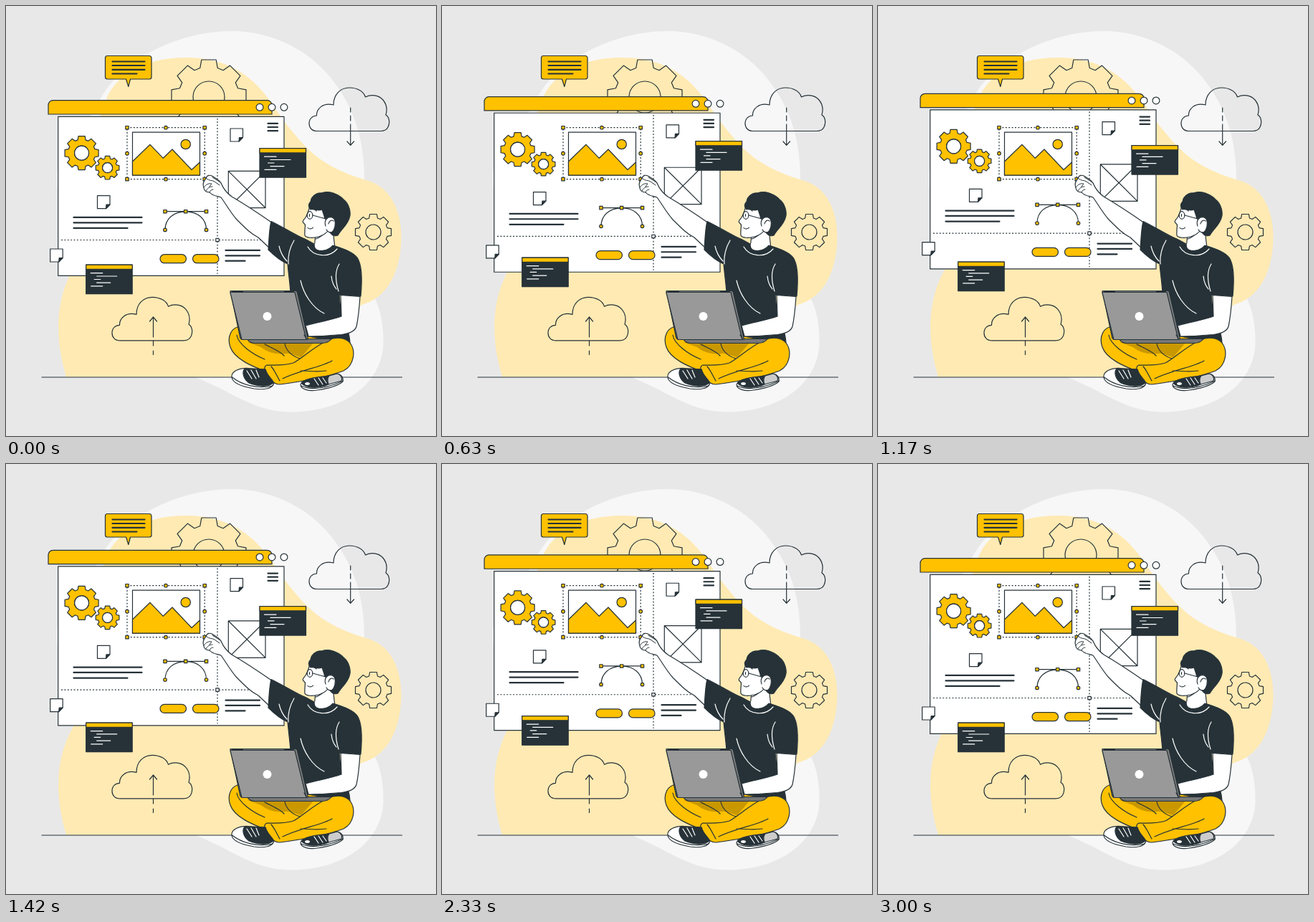
These frames come from a looping animation (600 px wide and 600 px high, 3.04 s). An HTML page:

```html
<!DOCTYPE html>
<html lang="en">
<head>
<meta charset="utf-8">
<title>Design at work</title>
<style>
html, body { margin: 0; width: 100%; height: 100%; overflow: hidden; background: #e8e8e8; }
svg { display: block; width: 600px; height: 600px; }
svg { fill: none; stroke: #263238; stroke-width: 1.2; stroke-linejoin: round; stroke-linecap: round; }
.y { fill: #ffc100; }
.w { fill: #fff; }
.d { fill: #263238; }
.flat { stroke: none; }
.bold { stroke-width: 2.2; }
.thin { stroke-width: 1; }
.light { stroke: #fff; }
.dots { stroke-dasharray: 2 2.4; stroke-linecap: butt; }
</style>
</head>
<body>
<svg viewBox="0 0 600 600">
  <defs>
    <g id="cloud">
      <path d="M434 174.5C427 174.5 423 170 423 164C423 157 428 153 433.500 153C433 144 442 134 457 138C457 123 467 114 479 114C490 114 499 119 501.500 127C509 123 520 124 526 131C532 138 532 145 530 152C535 155 536 163 533 169C531 173 528 174.500 523 174.500Z"/>
    </g>
    <g id="note">
      <path class="w" d="M0 0H17.500V12L12 18H0Z"/>
      <path class="d" d="M17.500 12.500H12.500L12 18Z"/>
    </g>
    <g id="console">
      <path class="d" d="M0 0H64.500V40.500H0Z"/>
      <path class="y" d="M0 0H64.500V6.200H0Z"/>
      <path class="light" d="M6.500 11.500H23M15 15.800H43M11.500 20.300H20M15 25H34M7 29.700H23"/>
    </g>
    <path id="knob" class="y" d="M-2.200-2.200H2.200V2.200H-2.200Z"/>
    <circle id="dot" class="y" r="2.300"/>
  </defs>

  <!-- backdrop -->
  <path class="flat" fill="#f7f7f7" d="M315 35C375 35 430 65 462 112C490 152 501 195 500 250L505 395C520 410 527 438 526.500 470C526 520 480 566 398 566.500C345 566 320 540 262 517L120 400C95 350 70 290 71 235C72 200 110 175 131 131C160 75 240 35 315 35Z"/>
  <path class="flat" fill="#ffeab3" d="M84 517.500C69 467 69 420 87 380C97 360 120 330 122 250C123 200 125 165 140 130C155 92 200 72 250 72C315 72 346 102 369 133C384 156 399 176 416 194C442 222 475 235 509 245C540 257 552 290 551.500 325C550 375 530 408 496 417L400 517.500Z"/>
  <path d="M50 518H552.500"/>
  <use href="#cloud"/>
  <use href="#cloud" x="-275" y="292.300"/>
  <path d="M480.700 142V148M480.700 153V160M480.700 165V194M476 189L480.700 194.300L485.500 189M205.500 486.500V481M205.500 474V467M205.500 462V434M200.500 440L205.500 434L210.500 440"/>
  <path class="gear" data-gear="283 127 52 22"/>
  <path class="gear" data-gear="512.500 315.500 25 10.500"/>
  <path class="y" d="M141.500 69.500H200A3 3 0 0 1 203 72.500V99A3 3 0 0 1 200 102H173.500L170.800 112.500L167.500 102H141.500A3 3 0 0 1 138.500 99V72.500A3 3 0 0 1 141.500 69.500Z"/>
  <path class="bold" d="M148.500 77.500H193.500M148.500 83H193.500M148.500 88.800H193.500M148.500 94.500H182.500"/>

  <!-- browser window -->
  <g id="win">
    <path class="y" d="M59 151.300V138.500A6.500 6.500 0 0 1 65.500 132H364.500A6.500 6.500 0 0 1 371 138.500V151.300Z"/>
    <g class="w"><circle cx="354" cy="141.600" r="4.900"/><circle cx="371" cy="141.600" r="4.900"/><circle cx="388" cy="141.600" r="4.900"/></g>
    <path class="w" d="M72.700 154.600H388V376.600H72.700Z"/>
    <path class="dots" d="M77 326.800H386M295 157V374"/>
    <path class="w" d="M292.800 324.600H297.200V329H292.800Z"/>
    <path class="bold" d="M365.500 164.200H379M365.500 169.300H379M365.500 174.500H379M94.500 295.200H189.500M94.500 302.600H189.500M94.500 310.200H169.500M306.500 341.200H354M306.500 348.600H354M306.500 356H333.500"/>
    <rect class="y" x="215" y="347" width="36.500" height="12" rx="6"/>
    <rect class="y" x="260.500" y="347" width="36.500" height="12" rx="6"/>
    <path class="gear y" data-gear="105.600 205.500 23.500 10"/>
    <path class="gear y" data-gear="141.600 226 16.300 7"/>
    <circle class="w" cx="105.600" cy="205.500" r="10"/>
    <circle class="w" cx="141.600" cy="226" r="7"/>
    <use href="#note" x="313" y="171.300"/>
    <use href="#note" x="127.500" y="265"/>
    <use href="#note" x="61.700" y="339.300"/>
    <path class="w" d="M310.300 230.600H362V282H310.300ZL362 282M362 230.600L310.300 282"/>
    <path d="M222 287H279.500M222 312.700C222 297 234 287.200 250.700 287.200S279.500 297 279.500 312.700"/>
    <use href="#knob" x="222" y="287"/><use href="#knob" x="250.700" y="287"/><use href="#knob" x="279.500" y="287"/>
    <use href="#dot" x="222" y="312.700"/><use href="#dot" x="279.500" y="312.700"/>
  </g>

  <!-- picture being dragged -->
  <path class="dots" d="M169 169.700H277.200V241.700H169Z"/>
  <path class="w" d="M176.500 176.200H270.500V236.200H176.500Z"/>
  <path class="y" d="M176.500 217L201 193.300L219.300 212.300L232 200L259 228.500L270.500 218V236.200H176.500Z"/>
  <circle class="y" cx="250.700" cy="193" r="6.700"/>
  <use href="#knob" x="169" y="169.700"/><use href="#knob" x="277.200" y="169.700"/>
  <use href="#knob" x="169" y="241.700"/><use href="#knob" x="277.200" y="241.700"/>
  <use href="#dot" x="223" y="169.700"/><use href="#dot" x="223" y="241.700"/>
  <use href="#dot" x="169" y="205.700"/><use href="#dot" x="277.200" y="205.700"/>

  <g class="float"><use href="#console" x="354" y="199.300"/></g>
  <g class="float"><use href="#console" x="111.700" y="361.800"/></g>

  <!-- raised arm -->
  <path class="w" d="M372 303C352 289 332 276 315 266C308 261 304 256 301 249C299 243 293 241 289 238C285 235 280 236 279.500 240C276 244 274 249 276 253C276 257 279 260 284 260C288 265 294 265 300 267C306 275 313 288 322 298C335 311 342 318 352 323L368 338Z"/>
  <path class="thin" d="M280 241C283 244 288 243 291 245L298 250M276 253C279 249 283 247 287 248L284 252M279 258C281 254 284 252 288 252M284 260C285 257 287 256 289 256M288 239L299 246"/>

  <!-- head -->
  <path class="w" d="M432 317L430 340C440 350 453 347 459 338L456 312Z"/>
  <path class="w" d="M424 279C422 287 420 292 418 295C416 298 413 300 414.500 302C416 303.500 418 304 417.500 307C417 312 416.500 316 417 320C419 324 428 324 436 322C444 320 450 314 454 308L455 280Z"/>
  <path class="d" d="M425 284C421 280 422 276 425 273C426 265 434 260 440 261C450 257 464 262 471 270C479 276 482 289 479 296C476 306 468 311 463 320C458 322 454 319 452 316L448 296C446 298 444 297 444 293C443 290 442 287 441 284C434 287 429 282 425 284Z"/>
  <path class="w" d="M446 307C443 299 449 293 455 295C461 297 460 308 457 313C454 318 449 316 447 312"/>
  <path d="M450 304C451 299 455 298 457 300M421 309.500C423 312 427 311 428.500 309M426 282C429 282 431 284 433 286M428 292L446 297"/>
  <ellipse cx="424" cy="292" rx="3.800" ry="5.300"/>
  <path d="M423.500 290.500V293.500M441 320C437 323 434 325 432 325"/>

  <!-- far arm and shirt -->
  <path class="d" d="M370 300.500C386 308 406 321 419 326L430 332C429 342 441 346 456 334C470 338 484 343 490 351C497 361 497 384 495 405L465 403L468 434C473 445 481 455 480 478H400L397 400C396 385 394 372 393 360C384 356 374 348 366 340C367 327 367 313 370 300.500Z"/>
  <path class="w" d="M467 403.500L494 405.500C493 420 492 434 489 447C487 454 480 457 468 458.500C450 460 434 461 422 461L418 446C434 441 452 439 468 433Z"/>
  <path class="w" d="M431 331C428 342 447 345 456 333L456 329Z" stroke="none"/>
  <path class="light" d="M421 336C429 350 451 352 462 339M402 327C396 337 393 346 394 360M381 335C383 344 388 352 392 356M465 360C458 371 460 385 464 398M454 377C455 387 458 391 461 395M411 383C415 401 427 421 444 429"/>

  <!-- crossed legs -->
  <path class="y" d="M329 447C314 447 308 462 313 476C319 493 344 503 365 511L416 508L449 466L410 459Z"/>
  <path class="flat" fill="#c99800" d="M337 469L430 469L412 490C402 488 397 484 390 485C378 487 364 483 356 476Z"/>
  <path class="y" d="M450 466C461 461 474 463 480 470C489 482 485 502 471 509C450 517 413 524 382 528C373 528 369 521 364 516C360 511 359 503 364 501C376 501 390 502 401 498C414 491 430 475 450 466Z"/>
  <path d="M370 503C374 507 378 516 382 523M386 520C410 508 440 504 455 495M322 459C324 472 344 486 361 493M361 472C373 478 383 482 388 488M389 471C391 481 398 488 410 492M411 509C425 509 432 511 447 509"/>

  <!-- laptop -->
  <path fill="#777" d="M337 464.500H454C451 469 447 470.500 440 470.500H346Q339 470 337 464.500Z"/>
  <path fill="#808080" d="M313 397.500H404Q406 397.500 406.500 400L421.500 465H330Q327 465 326.500 462Z"/>
  <path fill="#999" d="M312.800 399.500H403L419 465.500H329Z"/>
  <path class="bold" d="M316 399H330M389 399H401"/>
  <path d="M416 459L419 464"/>
  <circle class="w flat" cx="364.500" cy="433" r="6"/>

  <!-- shoes -->
  <path class="w" d="M315 518C314 510 325 505 338 505.500L362 507C364 516 371 520 374 526C372 534 360 536 346 534C329 531 316 526 315 518Z"/>
  <path class="d" d="M333 506L362 507C364 516 371 520 373 526C366 532 351 531 339 526C331 520 329 511 333 506Z"/>
  <path d="M315.500 518C328 528 350 535 372 530"/>
  <path class="light" d="M336 509L343 520M342 508L349 520M349 508L353 518"/>
  <path class="w" d="M411 528C416 520 430 518 450 516L461 513C468 513 471 519 470 524C463 530 449 534 434 536C423 538 411 535 411 528Z"/>
  <path class="d" d="M412 526C416 520 433 519 451 516L450 528C439 533 420 535 412 526Z"/>
  <path fill="#ccc" d="M451 516L462 513C467 514 470 519 468 523L450 528C448 523 448 520 451 516Z"/>
  <path class="light" d="M430 520L436 529M436 519L442 528M442 519L447 526"/>
  <ellipse class="w" cx="420.500" cy="527" rx="4" ry="2.500"/>
  <path d="M412 530C428 538 454 531 470 523"/>
</svg>
<script>
const LOOP = 3040, CYCLE = 3000, LEAD = 35, RISE = 12;

// Eight-toothed wheel with a round hub
function gearPath(x, y, outer, hub) {
  const pts = [];
  for (let i = 0; i < 8; i++) {
    const a = i * Math.PI / 4, c = Math.cos(a), s = Math.sin(a);
    for (const [u, v] of [[-.235, -.78], [-.195, -1], [.195, -1], [.235, -.78]])
      pts.push((x + outer * (u * c - v * s)).toFixed(2) + " " + (y + outer * (u * s + v * c)).toFixed(2));
  }
  return `M${pts.join("L")}ZM${x - hub} ${y}a${hub} ${hub} 0 1 1 ${2 * hub} 0a${hub} ${hub} 0 1 1 ${-2 * hub} 0Z`;
}

for (const g of document.querySelectorAll(".gear"))
  g.setAttribute("d", gearPath(...g.dataset.gear.split(" ").map(Number)));

const win = document.getElementById("win");
const floats = document.querySelectorAll(".float");

// Linear up-and-down travel over one period
function lift(time, period) {
  const p = time % period / period;
  return -RISE * (1 - Math.abs(2 * p - 1));
}

function move(el, y) {
  el.setAttribute("transform", `translate(0 ${y.toFixed(2)})`);
}

function draw() {
  const time = performance.now() % LOOP + LEAD;
  move(win, lift(time, CYCLE));
  for (const el of floats) move(el, lift(time, CYCLE / 2));
  requestAnimationFrame(draw);
}
draw();
</script>
</body>
</html>
```
